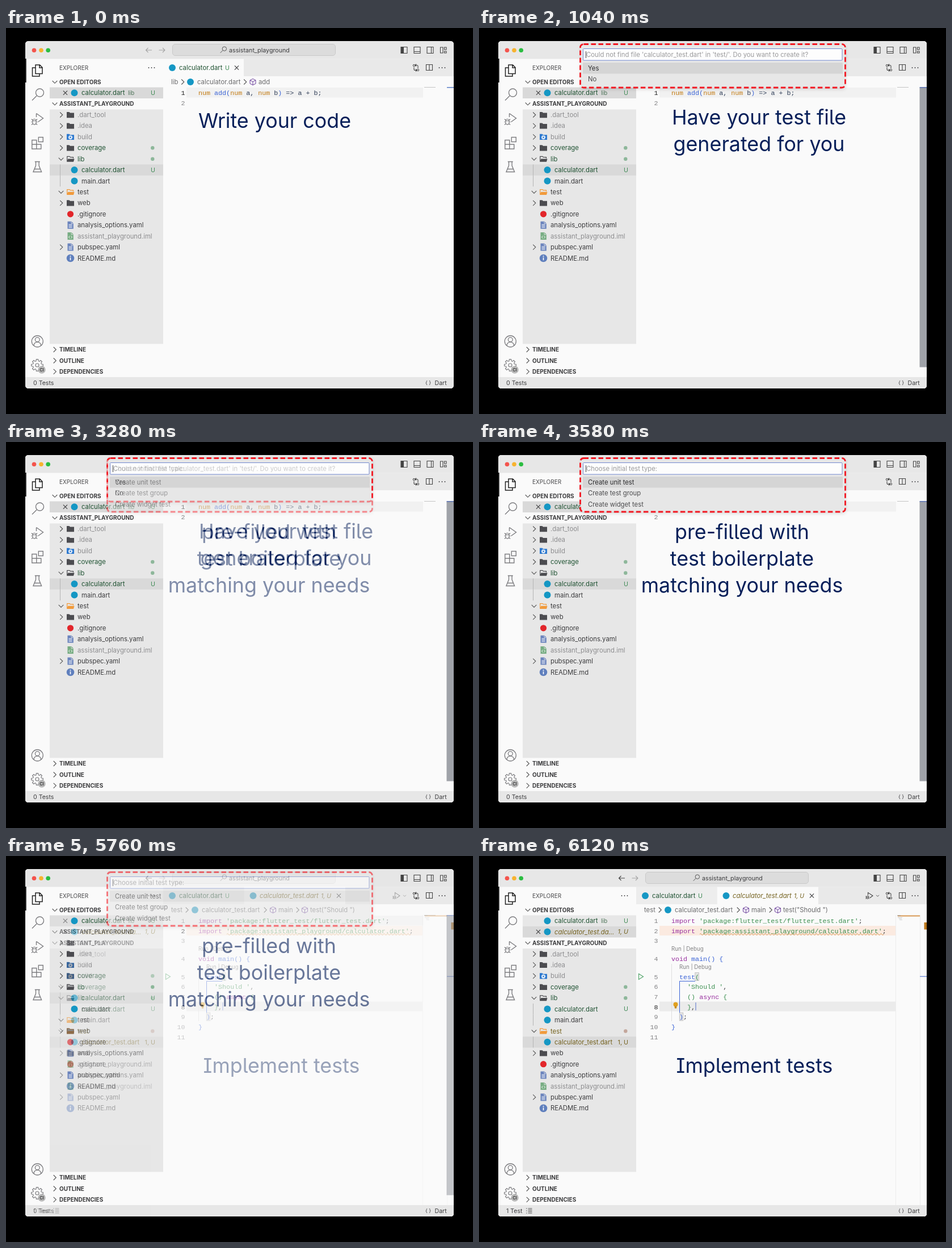
Write an HTML page that moves like this. It is 823 px wide and 680 px high and loops after 8000 ms.

```html
<!DOCTYPE html>
<html lang="en">
<head>
<meta charset="utf-8">
<title>Test generation demo</title>
<style>
html, body { margin: 0; width: 100%; height: 100%; overflow: hidden; background: #000; }
svg { display: block; }
text { font-family: Inter, "Liberation Sans", sans-serif; font-optical-sizing: none; white-space: pre; }
.code { font-family: "Liberation Mono", "DejaVu Sans Mono", monospace; }
.title { font-feature-settings: "cv05", "cv08"; }
</style>
</head>
<body>
<svg id="stage" width="823" height="680" viewBox="0 0 823 680"></svg>
<script>
const INK = '#3b3b3d', MUTED = '#8d8d8f', GREEN = '#1f5232', BADGE = '#3f8a55', GOLD = '#73601c',
  PANEL = '#e7e7e7', LIGHT = '#fafafa', PICK = '#d9d9d9', BLUE = '#3a63d6', PURPLE = '#98309f',
  STRING = '#3c8f50', NAVY = '#08205a';

// Drawing helpers; y of a text is the middle of its line.
const rect = (x, y, w, h, fill, more = '') =>
  `<rect x="${x}" y="${y}" width="${w}" height="${h}" fill="${fill}" ${more}/>`;
const disc = (x, y, r, fill, more = '') => `<circle cx="${x}" cy="${y}" r="${r}" fill="${fill}" ${more}/>`;
const text = (x, y, s, fill = INK, size = 11.3, more = '') =>
  `<text x="${x}" y="${y + size * 0.36}" font-size="${size}" fill="${fill}" ${more}>${s}</text>`;
const line = (d, stroke = INK, width = 1, x = 0, y = 0, more = '') =>
  `<path transform="translate(${x} ${y})" d="${d}" fill="none" stroke="${stroke}" stroke-width="${width}" ${more}/>`;
const solid = (d, fill, x, y) => `<path transform="translate(${x} ${y})" d="${d}" fill="${fill}"/>`;
const italic = 'font-style="italic"';

const right = (x, y, c = '#555') => line('M-2.3 -4.5L2.3 0L-2.3 4.5', c, 1.1, x, y);
const down = (x, y, c = '#555') => line('M-4.3 -2L0 2.3L4.3 -2', c, 1.1, x, y);
const cross = (x, y) => line('M-3.6 -3.6L3.6 3.6M3.6 -3.6L-3.6 3.6', INK, 1.1, x, y);
const dots = (x, y) => [-5, 0, 5].map(d => disc(x + d, y, 0.9, INK)).join('');
const cube = (x, y) => line('M0 -5.5L5 -3V3L0 5.5L-5 3V-3ZM-5 -3L0 -0.5L5 -3M0 -0.5V5.5', '#6b3f9c', 1, x, y);
const dart = (x, y) => disc(x, y, 6, '#1597c4');
const lens = (x, y, k, c, w) => line(`M${-k} ${k}L${-k * 0.2} ${k * 0.2}`, c, w, x, y) +
  disc(x + k * 0.35, y - k * 0.35, k * 0.7, 'none', `stroke="${c}" stroke-width="${w}"`);

const page = (c, mark) => (x, y) =>
  solid('M-5 -6.5H1.8L5.3 -3V6.5H-5Z', c, x, y) + line('M1.5 -6V-2.8H5', '#e7e7e7', 0.9, x, y) + line(mark, '#fff', 1, x, y);
const folder = c => (x, y) => solid('M-6.5 -5H-2L-0.5 -3.5H6.5V5.2H-6.5Z', c, x, y);
const openFolder = c => (x, y) => line('M-5.8 4V-4.4H-1.5L0 -3H5V-1', c, 1.2, x, y) +
  solid('M-4.3 -0.2H7L5.5 5H-6.5Z', c, x, y);
const icons = {
  dir: folder('#4c4c50'), open: openFolder('#4c4c50'), test: openFolder('#f19a3b'),
  build: (x, y) => folder('#2d79cf')(x, y) + disc(x, y + 0.8, 2.2, 'none', 'stroke="#fff" stroke-width="1.6"') +
    disc(x, y + 0.8, 3.5, 'none', 'stroke="#fff" stroke-width="1" stroke-dasharray="1.3 1.45"'),
  git: (x, y) => disc(x, y, 5.6, '#e2262b'),
  yaml: page('#6b84bd', 'M-3 -0.8H3M-3 1.6H3M-3 4H3'),
  iml: page('#78ad83', 'M-1 -0.5L-3 1.8L-1 4M1 -0.5L3 1.8L1 4'),
  info: (x, y) => disc(x, y, 6.8, '#5f7fbd') + rect(x - 0.8, y - 1.3, 1.6, 5, '#fff') + disc(x, y - 3.4, 1, '#fff'),
  dart
};

function activityBar() {
  const c = '#7d7d80';
  const gear = Array.from({ length: 8 }, (_, i) =>
    `<path transform="translate(55 594) rotate(${i * 45})" d="M-2 -7.5L-1.6 -10.3H1.6L2 -7.5" fill="none" stroke="${c}" stroke-width="1.2"/>`).join('');
  return rect(34, 54, 1.8, 42, '#222') +
    line('M-3 -10H4.5L9 -5.5V5.5H-3ZM4 -10V-5H9M-3 -5H-8.5V10H4V5.5', '#222', 1.5, 55, 75) +
    lens(56, 117.5, 10, c, 1.4) +
    line('M-2 -9.5L10 -1L1 5.5M-2 -9.5V-3', c, 1.4, 55.5, 160) +
    line('M-3 0A3 3 0 0 1 3 0V3A3 3.6 0 0 1 -3 3ZM-3 0H3M-3 2H-5.5M3 2H5.5M-3 -1L-5 -3M3 -1L5 -3M-3 5L-5 7M3 5L5 7', c, 1.2, 50, 163.5) +
    line('M-9.5 -5H-1.5V10.5H-9.5ZM-9.5 2.5H6.5V10.5H-1.5M2 -10H10V-2H2Z', c, 1.4, 55.3, 202.5) +
    line('M-4.5 -9H4.5M-2.8 -9V-2L-7.3 9H7.3L2.8 -2V-9M-5.3 4H5.3', c, 1.4, 55.3, 244.5) +
    disc(55.3, 552, 10, 'none', `stroke="${c}" stroke-width="1.3"`) +
    disc(55.3, 549, 3.9, 'none', `stroke="${c}" stroke-width="1.3"`) +
    line('M-6.5 7.3C-5 -0.5 5 -0.5 6.5 7.3', c, 1.3, 55.3, 552) +
    disc(55, 594, 7.6, 'none', `stroke="${c}" stroke-width="1.2" stroke-dasharray="2.2 3.77" stroke-dashoffset="-1.9"`) +
    gear + disc(55, 594, 3, 'none', `stroke="${c}" stroke-width="1.2"`) +
    disc(63, 602, 6.7, '#b8b8b8') + text(63, 602, 'CI', '#333', 7.5, 'text-anchor="middle" font-weight="600"');
}

function windowFrame(last) {
  const box = x => line('M-5.5 -5.5H5.5V5.5H-5.5Z', '#444', 1.1, x, 39);
  return rect(34, 23, 755, 612, LIGHT) + rect(34, 23, 755, 31.5, PANEL) +
    disc(49.5, 39.3, 3.8, '#f4544d') + disc(62, 39.3, 3.8, '#f7b32f') + disc(74.2, 39.3, 3.8, '#2bbd41') +
    line('M5.5 0H-5M-1 -4L-5 0L-1 4', last ? '#444' : '#a3a3a3', 1.1, 251.5, 39) +
    line('M-5.5 0H5M1 -4L5 0L1 4', '#a3a3a3', 1.1, 275, 39) +
    rect(293.5, 28.5, 287, 20, '#dcdcdc', 'rx="4.5" stroke="#c9c9c9"') +
    lens(383, 38.5, 5.3, '#555', 1) + text(393, 39, 'assistant_playground', INK, 10.7) +
    box(701.5) + rect(696, 33.5, 5, 11, '#444') + box(724.5) + line('M719 41.5H730', '#444', 1.1) +
    box(747.5) + line('M749.5 33.5V44.5', '#444', 1.1) +
    line('M-5 -5H-0.5V5H-5ZM2 -5H5.5V-1H2ZM2 2H5.5V5H2Z', '#444', 1.1, 770.5, 39) +
    activityBar() + rect(34, 615, 755, 20, PANEL) +
    text(48, 625, last ? '1 Test' : '0 Tests', INK, 10.6) +
    (last ? line('M0 -4H1.5M0 0H1.5M0 4H1.5M3.5 -4H10.5M3.5 -1.3H10.5M3.5 1.3H10.5M3.5 4H10.5', INK, 0.9, 83, 625) : '') +
    text(739, 624.5, '{ }', INK, 9) + text(755.5, 625, 'Dart', INK, 10.6);
}

function tree(top, rows) {
  return rows.map(([icon, name, color, arrow, deep, badge], i) => {
    const y = top + i * 19.42, dx = deep ? 7 : 0;
    return (deep === 2 ? rect(77, y - 9.7, 200, 19.4, PICK) : '') +
      (deep ? line(`M95.5 ${y - 9.7}V${y + 9.7}`, '#b5b5b5') : '') +
      (arrow === '>' ? right(97.5, y) : arrow === 'v' ? down(97, y) : '') +
      icons[icon](113.5 + dx, y) + text(126 + dx, y, name, color) +
      (!badge ? '' : badge[0] === '#' ? disc(258.3, y, 3.2, badge)
        : text(263, y, badge, badge === 'U' ? BADGE : GOLD, 10.7, 'text-anchor="end"'));
  }).join('');
}

function sidebar(last) {
  const head = (y, s, mark) => mark(86, y) + text(94, y, s, INK, 10, 'font-weight="700"');
  const shift = last ? 19.5 : 0, dot = '#8db79a';
  const libRows = [
    ['dir', '.dart_tool', MUTED, '>'], ['dir', '.idea', MUTED, '>'], ['build', 'build', MUTED, '>'],
    ['dir', 'coverage', GREEN, '>', 0, dot], ['open', 'lib', GREEN, 'v', 0, dot],
    ['dart', 'calculator.dart', GREEN, '', last ? 0.5 : 2, 'U'], ['dart', 'main.dart', INK, '', last ? 0.5 : 1]];
  const testRows = last
    ? [['test', 'test', GOLD, 'v', 0, '#c3a69b'], ['dart', 'calculator_test.dart', GOLD, '', 2, '1, U']]
    : [['test', 'test', INK, 'v']];
  const rest = [['dir', 'web', INK, '>'], ['git', '.gitignore', INK], ['yaml', 'analysis_options.yaml', INK],
    ['iml', 'assistant_playground.iml', MUTED], ['yaml', 'pubspec.yaml', INK, '>'], ['info', 'README.md', INK]];
  const all = [...libRows, ...testRows, ...rest];
  return text(94, 70, 'EXPLORER', '#4a4a4c', 10) + dots(256.5, 70) + head(95, 'OPEN EDITORS', down) +
    rect(77, 104.5, 200, 19.5, last ? PANEL : PICK) + (last ? rect(77, 124, 200, 19.5, PICK) : '') +
    cross(104.5, last ? 133.5 : 114.2) + dart(120.5, 114.2) + text(133, 114.2, 'calculator.dart', GREEN) +
    text(215, 114.2, 'lib', '#4d7358', 10.3) + text(263, 114.2, 'U', BADGE, 10.7, 'text-anchor="end"') +
    (last ? dart(120.5, 133.5) + text(133, 133.5, 'calculator_test.da…', GOLD, 11.3, italic) +
      text(263, 133.5, '1, U', GOLD, 10.7, `${italic} text-anchor="end"`) : '') +
    head(133.5 + shift, 'ASSISTANT_PLAYGROUND', down) + rect(77, 143.5 + shift, 200, 413 - shift, PANEL) +
    tree(153 + shift, all) +
    head(566.5, 'TIMELINE', right) + head(586, 'OUTLINE', right) + head(605.3, 'DEPENDENCIES', right);
}

function tabs(last) {
  const crumb = (x, s) => text(x, 95, s, '#6b6b6d');
  const bar = rect(277, 54.5, 512, 30.5, '#e9e9e9') +
    (last ? rect(277, 54.5, 142, 30.5, '#ededed') + rect(419.5, 54.5, 178.5, 30.5, LIGHT) : rect(277, 54.5, 142, 30.5, LIGHT)) +
    dart(293, 70) + text(305, 70, 'calculator.dart', GREEN) + text(386, 70, 'U', BADGE, 10.7) +
    line('M-3.5 -1V2.5A2 2 0 0 0 -1.5 4.5H1.5M-0.5 2.5L1.5 4.5L-0.5 6.5M3.5 1V-2.5A2 2 0 0 0 1.5 -4.5H-1.5M0.5 -6.5L-1.5 -4.5L0.5 -2.5', '#444', 1.1, 722.5, 70) +
    disc(719, 66, 1.7, '#e9e9e9', 'stroke="#444"') + disc(726, 74, 1.7, '#e9e9e9', 'stroke="#444"') +
    line('M-5.5 -5H5.5V5H-5.5ZM0 -5V5', '#444', 1.1, 746, 69.5) + dots(768.5, 70);
  if (!last) return bar + cross(406.5, 70) + crumb(291, 'lib') + right(311.5, 95) + dart(325, 95) +
    crumb(337, 'calculator.dart') + right(421.5, 95) + cube(435, 95) + crumb(445, 'add');
  return bar + dart(435.5, 70) + text(447, 70, 'calculator_test.dart', GOLD, 11.3, italic) +
    text(555, 70, '1, U', GOLD, 10.5, italic) + cross(586.5, 70) +
    line('M-2 -1V-6L6.5 -0.5L1 3.5', '#444', 1.1, 687.5, 70.5) +
    disc(684.5, 73, 2.4, 'none', 'stroke="#444"') + line('M681 70.5L688 75.5M681 75.5L688 70.5', '#444', 0.7) +
    line('M-2.5 -1.2L0 1.3L2.5 -1.2', '#555', 1, 702.5, 70) +
    crumb(291, 'test') + right(319, 95) + dart(333, 95) + crumb(345, 'calculator_test.dart') + right(457, 95) +
    cube(470.5, 95) + crumb(480, 'main') + right(514, 95) + cube(526.5, 95) + crumb(536, 'test("Should ")');
}

// parts: alternating colour and text
function code(col, y, ...parts) {
  let spans = '';
  for (let i = 0; i < parts.length; i += 2) spans += `<tspan fill="${parts[i]}">${parts[i + 1]}</tspan>`;
  return text(339 + col * 7.02, y, spans, INK, 11.7, 'class="code"');
}
const number = (n, y, on) => text(315.5, y, n, on ? '#222' : '#858587', 11.7, 'class="code" text-anchor="end"');

function addCode() {
  const num = '#c27a12', dark = '#2d3b55';
  return rect(318, 105, 417, 17.5, '#f1f1f1') + number(1, 114, true) + number(2, 131.5) +
    code(0, 114, num, 'num ', BLUE, 'add(', num, 'num', dark, ' a, ', num, 'num', dark, ' b', BLUE, ')', dark, ' => a + b;') +
    rect(737, 104, 20, 1, '#c4c4c4') + rect(777, 104, 12, 1.5, '#5b7fc7');
}

function testCode() {
  const ys = [114, 131.5, 149, 181, 212.5, 230, 247.8, 265.3, 283, 300.5, 318.5];
  const wave = 'M389 138' + 'q1.5 -3 3 0t3 0'.repeat(54);
  const hint = (x, y) => text(x, y, 'Run | Debug', '#808082', 9.7);
  const brace = (x, y) => rect(x, y, 6.5, 14, '#e5e5e5', 'stroke="#b9b9b9" stroke-width=".8"');
  return rect(318, 123, 417, 17, '#fbeae0') + rect(318, 256.5, 417, 17, '#ebebeb') +
    line('M734.5 104V615M777.5 104V615', '#ececec') +
    ys.map((y, i) => number(i + 1, y, i === 7)).join('') +
    brace(380.8, 205.5) + brace(353.3, 276) +
    line('M339.5 190V291', '#dedede') + line('M381 220.5H353.5V276', BLUE, 1) +
    code(0, ys[0], PURPLE, 'import ', STRING, "'package:flutter_test/flutter_test.dart'", INK, ';') +
    code(0, ys[1], PURPLE, 'import ', STRING, "'package:assistant_playground/calculator.dart'", INK, ';') +
    line(wave, '#d08a3c', 0.9) + hint(339, 164) +
    code(0, ys[3], PURPLE, 'void ', BLUE, 'main() {') + hint(353, 196) +
    code(2, ys[4], BLUE, 'test', STRING, '(') + code(4, ys[5], STRING, "'Should '", INK, ',') +
    code(4, ys[6], STRING, '() ', PURPLE, 'async ', STRING, '{') + code(4, ys[7], STRING, '}', INK, ',') +
    code(2, ys[8], BLUE, ')', INK, ';') + code(0, ys[9], BLUE, '}') +
    rect(381.5, 258, 1, 14, '#5471c9') +
    disc(346.5, 261.5, 4, '#e0a020') + rect(344.7, 264.5, 3.6, 4, '#c88b18', 'rx="1"') +
    line('M-3.5 -5L4.5 0L-3.5 5Z', '#55a56c', 1.2, 285, 212.5) +
    rect(738, 104.5, 39, 2, '#d99a55') + rect(737, 104.5, 6, 1, '#999') + rect(738, 108, 8, 1, '#ccc') +
    rect(740, 110, 5, 1, '#d2d2d2') + rect(741, 112, 5, 1, '#d2d2d2') +
    rect(784.5, 117, 4.5, 12.5, '#bd7a1f') + rect(777, 211.5, 12, 1.5, '#7f98dc');
}

function popup(bottom, prompt, choices) {
  return rect(776.5, 105, 12.5, 492.5, '#9fa2a8') +
    rect(776.5, 104, 12.5, 1.5, '#5b73b5') +
    rect(180, 29, 466, bottom - 27, '#000', 'rx="5" opacity=".13" filter="url(#blur)"') +
    rect(179, 29, 466.5, bottom - 30, PANEL, 'rx="5"') +
    rect(183.5, 36.5, 456.5, 20.5, '#fdfdfd', 'rx="1" stroke="#7389cf"') +
    rect(188, 41, 1, 12, '#444') + text(189, 47, prompt, '#9a9a9c') +
    rect(183, 61, 458, 19.5, '#d5d5d5') +
    choices.map((s, i) => text(192, 70.8 + i * 19.5, s, i ? '#4c4c4e' : '#2c2c2e')).join('') +
    rect(178.5, 28.5, 467, bottom - 29.5, 'none', 'rx="6" stroke="#f21822" stroke-width="2.8" stroke-dasharray="8.5 4.5"');
}

const headline = (x, y, ...rows) => rows.map((s, i) =>
  `<text class="title" x="${x}" y="${y + i * 47}" font-size="35.8" fill="${NAVY}" text-anchor="middle">${s}</text>`).join('');

const base = last => windowFrame(last) + sidebar(last) + tabs(last) + (last ? testCode() : addCode());
const scenes = [
  base(false) + headline(473.5, 176, 'Write your code'),
  base(false) + popup(106, "Could not find file 'calculator_test.dart' in 'test/'. Do you want to create it?", ['Yes', 'No']) +
    headline(493.5, 170, 'Have your test file', 'generated for you'),
  base(false) + popup(124, 'Choose initial test type:', ['Create unit test', 'Create test group', 'Create widget test']) +
    headline(463.5, 171, 'pre-filled with', 'test boilerplate', 'matching your needs'),
  base(true) + headline(485.5, 381.5, 'Implement tests')
];

const stage = document.getElementById('stage');
stage.innerHTML = '<defs><clipPath id="win"><rect x="34" y="23" width="755" height="612" rx="5.5"/></clipPath>' +
  '<filter id="blur"><feGaussianBlur stdDeviation="3"/></filter></defs><g clip-path="url(#win)">' +
  scenes.map(s => `<g class="scene">${s}</g>`).join('') + '</g>';
const layers = [...stage.querySelectorAll('.scene')];

// Each scene fades over the one before in ten steps of 60 ms.
const starts = [-1000, 500, 3040, 5580];
function tick() {
  const t = performance.now() % 8000;
  layers.forEach((layer, i) => {
    const step = Math.floor((t - starts[i]) / 60) + 1;
    layer.setAttribute('opacity', Math.max(0, Math.min(10, step)) / 10);
  });
  requestAnimationFrame(tick);
}
tick();
</script>
</body>
</html>
```
